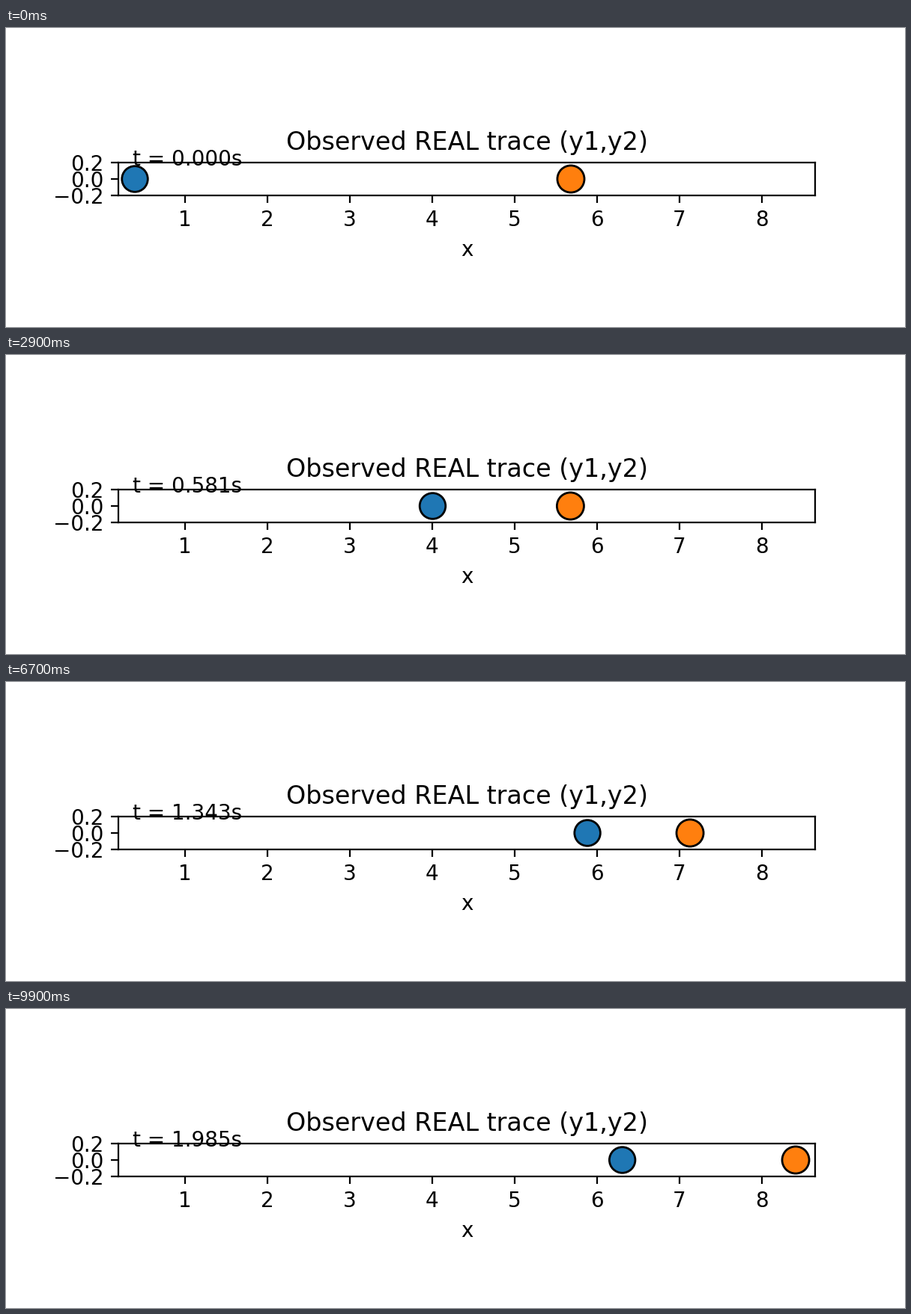
Write a matplotlib script that moves like this. It is 1200 px wide and 400 px high and loops after 10000 ms.

```python
import math

import matplotlib.pyplot as plt
from matplotlib.animation import FuncAnimation
from matplotlib.patches import Circle

plt.rcParams["font.family"] = "DejaVu Sans"

FRAMES = 100
INTERVAL = 100      # ms
DT = 0.02005        # simulated seconds per frame
T_HIT = 0.832       # moment of the collision


def glide(start, speed, drag, t):
    """Position of a ball slowed by drag proportional to its speed."""
    return start + speed * (1 - math.exp(-drag * t)) / drag


def positions(t):
    if t < T_HIT:
        return glide(0.392, 6.888, 0.36, t), glide(5.683, -0.01, 0.36, t)
    since_hit = t - T_HIT
    return glide(5.351, 1.27, 0.8, since_hit), glide(5.672, 3.325, 0.62, since_hit)


fig, ax = plt.subplots(figsize=(6, 2), dpi=200)
ax.set_aspect("equal")
ax.set_xlim(0.192, 8.647)
ax.set_ylim(-0.2, 0.2)
ax.set_xticks(range(1, 9))
ax.set_yticks([-0.2, 0.0, 0.2])
ax.set_xlabel("x")
ax.set_title("Observed REAL trace (y1,y2)")

balls = [
    ax.add_patch(Circle((0, 0), radius, facecolor=color, edgecolor="black"))
    for radius, color in ((0.157, "tab:blue"), (0.164, "tab:orange"))
]
clock = ax.text(0.02, 0.9, "", transform=ax.transAxes)


def update(frame):
    t = frame * DT
    for ball, x in zip(balls, positions(t)):
        ball.center = (x, 0)
    clock.set_text(f"t = {t:.3f}s")
    return [*balls, clock]


anim = FuncAnimation(fig, update, frames=FRAMES, interval=INTERVAL,
                     repeat=True, repeat_delay=0)
plt.show()
```
